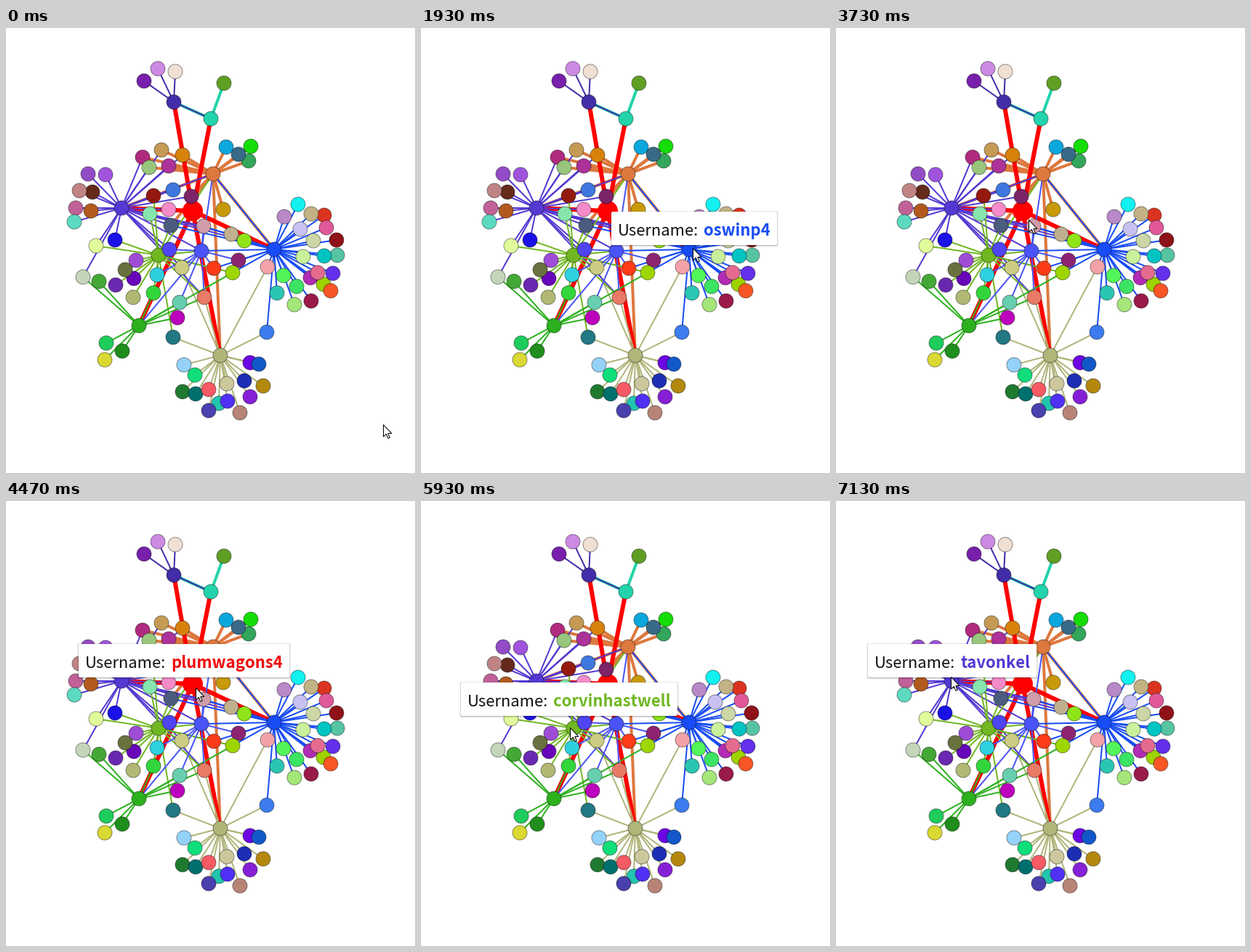
Recreate the animation shown at these times as a matplotlib script. Size 563 by 613 pixels, loop 8 s.

```python
import numpy as np
import matplotlib.pyplot as plt
from matplotlib.animation import FuncAnimation
from matplotlib.collections import LineCollection
from matplotlib.patches import FancyBboxPatch, Polygon

W, H, DPI = 563, 613, 64
PT = 72 / DPI                 # points per pixel
LOOP, INTERVAL = 8000, 20
STEP = 8000 / 120             # pointer positions are held for one step
FONT = "Noto Sans CJK JP"

HUBS = {
    "red": (257, 252, "#ff0000"),
    "indigo": (231, 102, "#432da8"),
    "teal": (282, 125, "#22d3ab"),
    "orange": (285, 201, "#dd783e"),
    "purple": (159, 248, "#5438d2"),
    "lime": (210, 313, "#70b722"),
    "green": (183, 410, "#2cb01e"),
    "blue": (369, 305, "#184cf5"),
    "azure": (269, 307, "#4a54f6"),
    "khaki": (295, 451, "#b0b57a"),
}

# Nodes linked to a single hub
LEAVES = {
    "indigo": [(209, 56, "#cc8ae3"), (233, 60, "#f0dfd3"), (190, 73, "#781fac")],
    "teal": [(300, 76, "#5f9f24")],
    "orange": [(303, 164, "#0ca7dd"), (334, 183, "#32a65a"),
               (337, 163, "#15dd07"), (320, 174, "#386a88")],
    "purple": [(113, 201, "#924cc6"), (137, 202, "#a054de"), (119, 226, "#642a1c"),
               (101, 224, "#c08484"), (96, 248, "#c06298"), (117, 252, "#b25a1e"),
               (94, 267, "#5cdac0")],
    "lime": [(179, 320, "#9e4cd6"), (176, 345, "#6806ba"), (164, 333, "#69713f"),
             (151, 354, "#6a28b0"), (175, 371, "#b2b874")],
    "green": [(128, 349, "#44a836"), (138, 434, "#1ecc5c"), (160, 445, "#1f8e1c"),
              (136, 457, "#dad832"), (236, 399, "#bc02bc")],
    "blue": [(402, 243, "#12f0f0"), (383, 260, "#b888c8"), (438, 258, "#da3420"),
             (420, 256, "#c2b284"), (441, 275, "#e05898"), (405, 277, "#c8c2f2"),
             (423, 293, "#ccd6a6"), (455, 292, "#8e1218"), (456, 313, "#56c4a2"),
             (438, 314, "#00c4c2"), (409, 315, "#caf09c"), (382, 341, "#52f65a"),
             (400, 356, "#3ce464"), (373, 365, "#2ac6b2"), (397, 381, "#a4e67a"),
             (420, 376, "#9a1a4a"), (419, 344, "#b22cb4"), (437, 353, "#9ed200"),
             (429, 337, "#e46a90"), (450, 338, "#6430ec"), (447, 362, "#f85624")],
    "khaki": [(245, 464, "#94d2fa"), (260, 478, "#10de7a"), (243, 501, "#1f7a30"),
              (261, 504, "#00706e"), (279, 498, "#f65a64"), (304, 490, "#ccc89c"),
              (328, 486, "#1c2eb4"), (336, 461, "#6c06e4"), (348, 463, "#1258c8"),
              (354, 493, "#b4880e"), (336, 508, "#8620d6"), (293, 517, "#22c4b0"),
              (305, 514, "#5030f4"), (279, 527, "#4a40ae"), (322, 530, "#b88478")],
}

# Nodes shared by several hubs
SHARED = {
    "berry": (188, 178, "#b02a80"), "sand": (214, 168, "#c59a55"),
    "amber": (243, 175, "#d8820c"), "sage": (197, 192, "#98c67c"),
    "plum": (224, 190, "#ac3299"), "gold": (299, 250, "#c89a0a"),
    "wine": (255, 232, "#7c2468"), "brick": (203, 231, "#941a10"),
    "sky": (230, 223, "#3e78de"), "mint": (198, 256, "#86e6ae"),
    "pink": (224, 250, "#f48ac8"), "slate": (227, 272, "#4c5c7e"),
    "lemon": (124, 300, "#e0fc9a"), "navy": (150, 292, "#1a12e6"),
    "pale": (106, 343, "#c4d6ba"), "violet": (225, 305, "#4f45f2"),
    "cyan": (208, 340, "#2ed0e0"), "leaf": (203, 365, "#32d63c"),
    "straw": (242, 330, "#cccc82"), "sea": (239, 378, "#68ceb0"),
    "rose": (272, 273, "#d09ca8"), "tan": (310, 284, "#c0b08e"),
    "apple": (328, 293, "#90e41a"), "grape": (320, 320, "#8c2472"),
    "flame": (286, 331, "#fc3c18"), "moss": (312, 337, "#9ed602"),
    "coral": (273, 371, "#e87a66"), "blush": (360, 329, "#f2a2a8"),
    "cobalt": (359, 419, "#3c7cf0"), "petrol": (230, 426, "#227884"),
}

LINKS = {
    "orange": "berry sand amber sage plum gold wine khaki blue purple slate",
    "teal": "indigo",
    "red": "indigo teal purple blue green khaki",
    "khaki": "petrol cobalt blush straw coral",
    "indigo": "teal",
    "purple": "berry sand amber sage plum brick sky mint pink slate wine lemon navy "
              "pale coral straw violet rose tan apple orange azure",
    "lime": "lemon navy cyan leaf mint brick slate straw violet azure flame moss "
            "coral petrol orange",
    "green": "pale sea leaf moss coral",
    "azure": "violet straw flame rose coral cyan green orange sea grape",
    "blue": "rose tan apple grape moss flame azure blush cobalt orange slate",
}
WIDTH = {"red": 6, "orange": 4, "teal": 4}

# Pointer path: step, x, y of the tip
PATH = np.array([
    (0, 519, 546), (18, 519, 546), (29, 374, 303), (30, 371, 304), (31, 371, 304),
    (34, 367, 302), (48, 367, 302), (49, 371, 301), (58, 250, 259), (66, 250, 259),
    (67, 261, 257), (69, 270, 280), (82, 270, 280), (83, 262, 275), (89, 205, 312),
    (90, 213, 320), (101, 213, 320), (102, 204, 307), (107, 158, 242)])

# Label text, colour and box positions: step, centre x, top
TIPS = [
    ("oswinp4", "#184cf5", [(28, 378, 262), (29, 375.5, 253), (30, 371, 253),
                            (31, 371, 253), (34, 365.5, 235), (48, 365.5, 235),
                            (49, 369.5, 235), (50, 364, 235)]),
    ("plumwagons4", "#f00808", [(57, 238, 201), (58, 234, 199), (66, 234, 199),
                                (67, 245, 197)]),
    ("BrenosLuma", "#d09ca8", [(68, 270, 212), (69, 273.5, 214), (82, 273.5, 214),
                               (83, 265.5, 211), (84, 259, 213)]),
    ("corvinhastwell", "#70b722", [(88, 206, 247), (89, 204, 250), (90, 215, 257),
                                   (101, 215, 257), (102, 205, 246), (103, 202, 243)]),
    ("tavonkel", "#5438d2", [(105, 172, 206), (106, 165, 200), (107, 160.5, 197),
                             (120, 160.5, 197)]),
]
ARROW = np.array([(0, 0), (0, 16.5), (3.8, 12.9), (6.4, 18.8), (8.8, 17.8),
                  (6.3, 12), (11.4, 12)])

fig = plt.figure(figsize=(W / DPI, H / DPI), dpi=DPI, facecolor="white")
ax = fig.add_axes([0, 0, 1, 1])
ax.set(xlim=(0, W), ylim=(H, 0))
ax.axis("off")


def draw_graph():
    spots = {**HUBS, **SHARED}
    lines, colors, widths = [], [], []
    for hub, names in LINKS.items():
        x, y, color = HUBS[hub]
        for end in [spots[n] for n in names.split()] + LEAVES.get(hub, []):
            lines.append([(x, y), end[:2]])
            colors.append(color)
            widths.append(WIDTH.get(hub, 2) * PT)
    ax.add_collection(LineCollection(lines, colors=colors, linewidths=widths, zorder=1))

    nodes = list(HUBS.values()) + sum(LEAVES.values(), []) + list(SHARED.values())
    xs, ys, fills = zip(*nodes)
    sizes = [(28 * PT) ** 2] + [(20 * PT) ** 2] * (len(nodes) - 1)
    edges = [(0, 0, 0, 0)] + [(0, 0, 0, 0.42)] * (len(nodes) - 1)
    ax.scatter(xs, ys, s=sizes, c=fills, edgecolors=edges, linewidths=PT, zorder=2)


def box(alpha, color, z):
    patch = FancyBboxPatch((0, 0), 1, 1, boxstyle="round,pad=0,rounding_size=2",
                           fc=color, ec="none", alpha=alpha, zorder=z)
    return ax.add_patch(patch)


def text(label, weight):
    return ax.text(0, 0, label, family=FONT, weight=weight, size=22 * PT,
                   color="#111111", va="baseline", zorder=7)


def text_width(item, label):
    item.set_text(label)
    return item.get_window_extent(fig.canvas.get_renderer()).width


draw_graph()
# Each layer: patch, spread, downward shift
layers = [(box(0.05, "black", 4), 2, 1), (box(0.10, "black", 5), 1, 0.6),
          (box(0.12, "black", 5), 0, 1), (box(1, "white", 6), 0, 0)]
caption, user = text("Username:", "normal"), text("", "bold")
lead = text_width(caption, "Username:") + 16
name_widths = [text_width(user, name) for name, _, _ in TIPS]
pointer = ax.add_patch(Polygon(ARROW, fc="white", ec="black", lw=PT,
                               joinstyle="miter", zorder=9))


def pointer_at(k):
    i = min(np.searchsorted(PATH[:, 0], k, side="right"), len(PATH) - 1)
    a, b = PATH[i - 1], PATH[i]
    u = min((k - a[0]) / (b[0] - a[0]), 1)
    return a[1:] + (b - a)[1:] * u * u * (3 - 2 * u)


def show_tip(k):
    parts = [layer[0] for layer in layers] + [caption, user]
    for part in parts:
        part.set_visible(False)
    for (name, color, keys), name_w in zip(TIPS, name_widths):
        steps, xs, tops = zip(*keys)
        if not steps[0] <= k <= steps[-1]:
            continue
        w = lead + name_w + 9
        left = round(np.interp(k, steps, xs) - w / 2)
        top = round(np.interp(k, steps, tops))
        for patch, grow, drop in layers:
            patch.set_bounds(left - grow, top - grow + drop, w + 2 * grow, 46 + 2 * grow)
        caption.set_position((left + 9, top + 33))
        user.set_position((left + lead, top + 33))
        user.set_text(name)
        user.set_color(color)
        for part in parts:
            part.set_visible(True)


def update(frame):
    k = int((frame * INTERVAL + 14) / STEP)
    pointer.set_xy(ARROW + np.round(pointer_at(k)) + 0.5)
    show_tip(k)
    return []


anim = FuncAnimation(fig, update, frames=LOOP // INTERVAL, interval=INTERVAL,
                     repeat=True, repeat_delay=0, blit=False)
plt.show()
```
